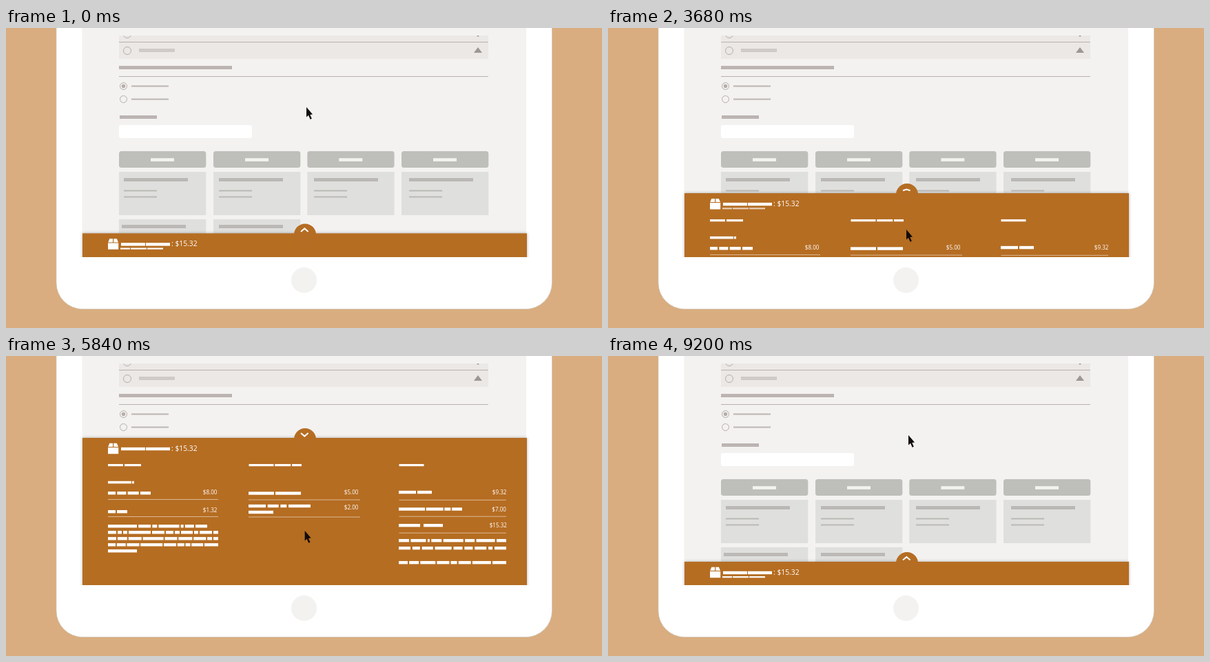
Write an HTML page that moves like this. It is 865 by 436 pixels and loops after 9.68 s.

```html
<!DOCTYPE html>
<html lang="en">
<head>
<meta charset="utf-8">
<title>Order summary sheet</title>
<style>
html, body { margin: 0; width: 100%; height: 100%; overflow: hidden; background: #d9ad7f; }
svg { display: block; width: 865px; height: 436px; }
text { font-family: "Open Sans", "Noto Sans", sans-serif; fill: #fff; }
</style>
</head>
<body>
<svg viewBox="0 0 865 436">
  <defs>
    <clipPath id="view"><rect x="100" width="670" height="333"/></clipPath>
    <clipPath id="list"><rect x="110" y="11" width="645" height="322"/></clipPath>
    <filter id="glow" x="-5%" y="-10%" width="110%" height="120%">
      <feDropShadow dx="0" dy="0" stdDeviation="2" flood-opacity=".3"/>
    </filter>
  </defs>
  <rect x="73" y="-60" width="719.5" height="468.5" rx="38" fill="#fff" stroke="#cfc3b5" stroke-width=".7"/>
  <rect x="110.5" width="644.5" height="333" fill="#f3f2f0"/>
  <circle cx="432.5" cy="366.5" r="18.5" fill="#f3f2f0"/>
  <g id="page" clip-path="url(#list)"></g>
  <g clip-path="url(#view)">
    <g id="sheet">
      <g fill="#b56d23">
        <rect x="111" width="645" height="260" filter="url(#glow)"/>
        <circle cx="434" cy="2" r="16"/>
      </g>
      <path id="chevron" fill="none" stroke="#fff" stroke-width="2"/>
      <path fill="#fff" d="M148 14h15.2v9.3h-15.2zM150.3 7.8h4.7v5.2h-6.8zM156.2 7.8h4.7l2.1 5.2h-6.8z"/>
      <g id="sub"></g>
    </g>
  </g>
  <path id="cursor" fill="#120b07" d="M0 0V14.5L3 11.8L5.6 17.8L7.8 16.8L5.3 11L9 10.6Z"/>
</svg>
<script>
const $ = id => document.getElementById(id);
const page = $('page'), sheet = $('sheet'), sub = $('sub');

function add(parent, tag, attrs) {
  const el = document.createElementNS('http://www.w3.org/2000/svg', tag);
  for (const k in attrs) el.setAttribute(k, attrs[k]);
  return parent.appendChild(el);
}
const box = (parent, x, y, width, height, fill, rx = 0) =>
  add(parent, 'rect', { x, y, width, height, fill, rx });
const ring = (x, y, r) =>
  add(page, 'circle', { cx: x, cy: y, r, fill: 'none', stroke: '#b6adab' });

// Page behind the sheet
box(page, 164, 11, 536, 34, '#ebe8e6');
box(page, 164, 20, 536, 1, '#bdb0ae');
ring(176, 9, 5.5);
ring(176, 33, 5.5);
add(page, 'path', { d: 'M679 36h12l-6-8zM683 11h4l-2 2z', fill: '#9d9694' });
box(page, 193, 30, 52, 5, '#cfc9c7');
box(page, 164, 55, 164, 5, '#bcb4b2');
box(page, 164, 70, 536, 1, '#b8afad');
for (const y of [84.5, 103.5]) {
  ring(170.5, y, 5);
  box(page, 182, y - 1, 54, 2, '#bcb5b2');
}
add(page, 'circle', { cx: 170.5, cy: 84.5, r: 2.7, fill: '#b6adab' });
box(page, 165, 127, 54, 5, '#bcb4b2');
box(page, 164, 141, 193, 19, '#fff', 3);
[164, 301, 437.3, 574].forEach((x, i) => {
  const inner = 171 + i * 138;
  box(page, x, 179, 126.3, 24, '#bebfbb', 3.5);
  box(page, x + 46, 189.2, 34, 4.6, '#f3f3f0');
  box(page, x, 209, 126.3, 63, '#dfe0de');
  box(page, inner, 218, 93, 5, '#bbb8b6');
  box(page, inner, 235.5, 48, 2, '#bbb9b6');
  box(page, inner, 244.5, 48, 2, '#bbb9b6');
  if (i < 2) {
    box(page, x, 278, 126.3, 63, '#dfe0de');
    box(page, i ? 309 : 168, 286, 93, 5, '#bbb8b6');
  }
});

// Sheet contents: words are bars, given by width, spread from x to end
function words(x, end, y, list, h = 4.4, parent = sheet) {
  const widths = list.split(' ').map(Number);
  const total = widths.reduce((a, b) => a + b);
  const gap = (end - x - total) / Math.max(1, widths.length - 1);
  for (const w of widths) {
    box(parent, x, y - h / 2, w, h, '#fff');
    x += w + gap;
  }
}
function price(s, x, y, size = 8.1, anchor = 'end') {
  add(sheet, 'text', { x, y, 'font-size': size, 'text-anchor': anchor }).textContent = s;
}
const rule = (x, end, y) => box(sheet, x, y - .5, end - x, 1, '#dcb893');

words(167, 238, 16, '35 35');
words(166, 228, 22.2, '14 23 23', 2.2, sub);
price(': $15.32', 240, 19, 10.3, 'start');

words(148, 196, 39.6, '22 24', 3.2);
words(148, 186, 64.6, '34 3', 3.6);
words(148, 210, 80.2, '11 13 16 15');
price('$8.00', 306.5, 82.3);
rule(148, 308, 89.5);
words(148, 176, 107.2, '11 15');
price('$1.32', 306.5, 108.2);
rule(148, 308, 114.5);
words(148, 292, 128.3, '42 18 7 30 4 13 17');
words(148, 308, 137.3, '12 6 6 32 18 11 7 17 6 18 7');
words(148, 308, 146.3, '12 14 19 30 18 20 18 7 7');
words(148, 308, 155.3, '11 13 18 32 18 10 7 17 20');
words(148, 190, 164.3, '42');

words(352.5, 429, 39.6, '36 23 14', 3.2);
words(352, 428, 80.5, '37 37');
price('$5.00', 511.5, 82.3);
rule(352, 514, 90);
words(352, 442, 99, '25 16 9 32');
words(352, 388, 108, '36');
price('$2.00', 511.5, 104.2);
rule(352, 514, 115);

words(570.5, 606.5, 39.6, '36', 3.2);
words(570, 618, 79, '25 21');
price('$9.32', 726.5, 82.3);
rule(570.5, 726, 90.3);
words(570, 662, 103.5, '38 25 9 15');
price('$7.00', 726, 107.2);
rule(570.5, 726, 114.2);
words(570, 634, 127.2, '31 28');
price('$15.32', 727, 130.2);
rule(570.5, 726, 138.2);
words(570, 726, 149.2, '15 22 3 15 29 14 27 14');
words(570, 726, 160.2, '17 11 16 24 13 12 17 6 17');
words(570, 726, 181.2, '13 14 22 18 9 18 27 20');

// Motion
const LOOP = 9680;
const bez = (s, a, b) => 3 * (1 - s) * (1 - s) * s * a + 3 * (1 - s) * s * s * b + s * s * s;
function ease(x) {
  if (x <= 0) return 0;
  if (x >= 1) return 1;
  let lo = 0, hi = 1;
  for (let i = 0; i < 24; i++) {
    const mid = (lo + hi) / 2;
    if (bez(mid, .225, .037) < x) lo = mid; else hi = mid;
  }
  return bez(lo, 0, 1);
}
const step = (t, start, length) => ease((t - start) / length);

function draw(now) {
  const t = now % LOOP;
  const open = step(t, 3500, 1100) - step(t, 7886, 1100);
  const down = step(t, 1260, 1220) - step(t, 5680, 1200);
  const settle = .6 * Math.max(0, 1 - t / 600);
  const bend = 2.3 * (1 - 2 * open);
  sheet.setAttribute('transform', `translate(0 ${299 - 180 * open - settle})`);
  sub.setAttribute('opacity', 1 - open);
  $('chevron').setAttribute('d', `M428 ${-4.7 + bend}L433.3 ${-4.7 - bend}L438.6 ${-4.7 + bend}`);
  $('cursor').setAttribute('transform', `translate(${436 - 3 * down} ${115 + 178 * down})`);
}
function frame() {
  draw(performance.now());
  requestAnimationFrame(frame);
}
frame();
</script>
</body>
</html>
```
